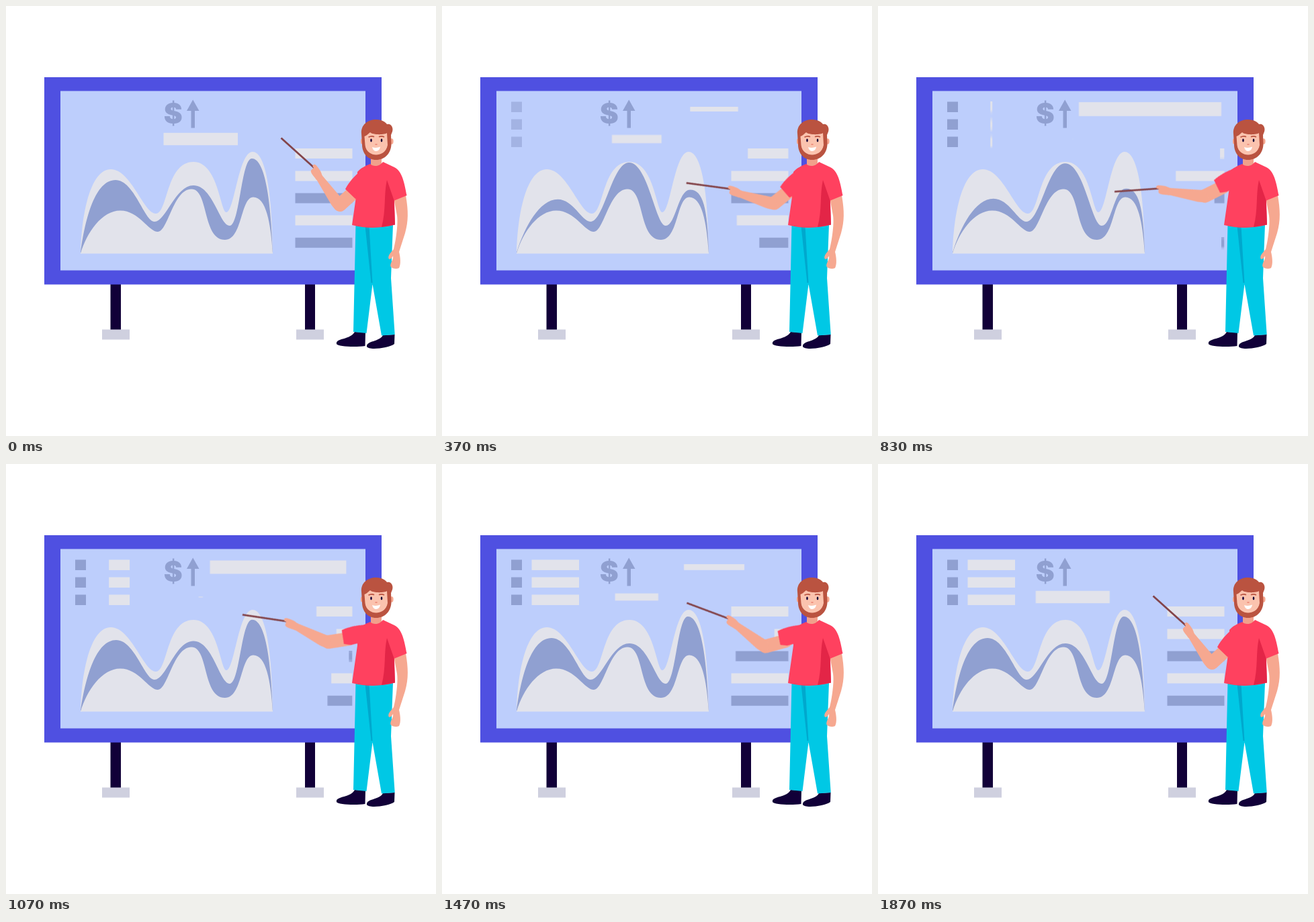
These frames come from a looping animation (640x640 px, 1930 ms). An HTML page:

```html
<!DOCTYPE html>
<html lang="en">
<head>
<meta charset="utf-8">
<title>Presentation</title>
<style>
  html, body { margin: 0; width: 100%; height: 100%; overflow: hidden; background: #fff; }
  svg { display: block; width: 100vw; height: 100vh; }

  .frame { fill: #4f50e1; }
  .screen { fill: #bdcefc; }
  .light { fill: #e2e3eb; }
  .dark { fill: #90a0d1; }
  .navy { fill: #110038; }
  .foot { fill: #cfd0df; }
  .skin { fill: #f6a890; }
  .hair { fill: #ba5340; }
  .shirt { fill: #ff415f; }
  .jeans { fill: #00c8e5; }
  .dollar { font: 900 42px Inter, "Liberation Sans", sans-serif; text-anchor: middle; }

  .move { animation: 1930ms cubic-bezier(.333, 0, .667, 1) infinite; }

  /* list bars, anchored at the right */
  .row { transform-origin: 515.5px 0; }
  .row1 { animation-name: row1; }
  .row2 { animation-name: row2; }
  .row3 { animation-name: row3; }
  .row4 { animation-name: row4; }
  .row5 { animation-name: row5; }
  @keyframes row1 { 0%, 10.36%, 65.8%, 100% { transform: none } 34.2%, 41.97% { transform: scaleX(.07) } }
  @keyframes row2 { 0%, 35.75%, 93.1%, 100% { transform: none } 64.77%, 69.3% { transform: scaleX(.05) } }
  @keyframes row3 { 0%, 20.57%, 80.6%, 100% { transform: none } 49.3%, 55.75% { transform: scaleX(.06) } }
  @keyframes row4 { 0%, 14.04%, 71.35%, 100% { transform: none } 40.93%, 44.4% { transform: scaleX(0) } }
  @keyframes row5 { 0%, 7%, 68.97%, 100% { transform: none } 30.83%, 45.1% { transform: scaleX(.053) } }

  /* headline bars swap */
  .head1 { transform-origin: 289.8px 198px; animation-name: shrink; }
  .head2 { transform-origin: 405px 153.5px; animation-name: grow; }
  @keyframes shrink { 0%, 2.33%, 98.7%, 100% { transform: none } 46.1%, 48.2% { transform: scale(0) } }
  @keyframes grow { 0%, 2.33%, 98.7%, 100% { transform: scale(0) } 46.1%, 48.2% { transform: none } }

  /* legend */
  .keys { animation-name: fade; animation-timing-function: linear; }
  .labels { transform-origin: 168.7px 0; animation-name: widen; }
  @keyframes fade { 0% { opacity: 0 } 34%, 100% { opacity: 1 } }
  @keyframes widen { 0%, 38.55% { transform: scaleX(0) } 75.4%, 100% { transform: none } }

  .wave { animation-name: wave; }
  @keyframes wave {
    0%, 1.04%, 60.1%, 100% {
      d: path("M111 367 C118 315 133 259 163 259 C191 259 206 321 221 321 C238 321 252 267 279 267 C308 267 318 327 333 327 C348 327 350 227 366 227 C384 227 394 280 397 367 Z");
    }
    31.1% {
      d: path("M111 367 C126 335 152 303 177 303 C198 303 209 321 221 321 C243 321 254 215 278 215 C306 215 318 327 333 327 C348 327 352 298 371 298 C391 298 396 312 397 367 Z");
    }
  }

  /* pointing arm */
  .joint { animation-timing-function: cubic-bezier(.4, 0, .7, .6); }
  .sleeve { transform-origin: 540px 252px; animation-name: sleeve; }
  .upper { transform-origin: 540px 252px; animation-name: upper; }
  .fore { transform-origin: 496px 298px; animation-name: fore; }
  .hand { transform-origin: 466px 255px; animation-name: hand; }
  @keyframes sleeve {
    0%, 96.9%, 100% { transform: rotate(0deg) }
    19.17% { transform: rotate(5deg); animation-timing-function: linear }
    32.64% { transform: rotate(10deg) }
    43% { transform: rotate(20deg); animation-timing-function: cubic-bezier(.3, .4, .6, 1) }
    55.44% { transform: rotate(37deg) }
    76.17% { transform: rotate(35deg); animation-timing-function: cubic-bezier(.35, .15, .6, 1) }
  }
  @keyframes upper {
    0%, 96.9%, 100% { transform: rotate(0deg) }
    19.17% { transform: rotate(3.3deg); animation-timing-function: cubic-bezier(.3, .4, .6, 1) }
    32.64% { transform: rotate(4.3deg) }
    43% { transform: rotate(15.6deg); animation-timing-function: cubic-bezier(.3, .4, .6, 1) }
    55.44% { transform: rotate(33.5deg) }
    76.17% { transform: rotate(27.3deg); animation-timing-function: cubic-bezier(.35, .15, .6, 1) }
  }
  @keyframes fore {
    0%, 96.9%, 100% { transform: rotate(0deg) }
    19.17% { transform: rotate(-41.1deg); animation-timing-function: cubic-bezier(.3, .4, .6, 1) }
    32.64% { transform: rotate(-59.4deg) }
    43% { transform: rotate(-61.8deg); animation-timing-function: cubic-bezier(.3, .4, .6, 1) }
    55.44% { transform: rotate(-61.2deg) }
    76.17% { transform: rotate(-44.6deg); animation-timing-function: cubic-bezier(.35, .15, .6, 1) }
  }
  @keyframes hand {
    0%, 96.9%, 100% { transform: rotate(0deg) }
    19.17% { transform: rotate(3.6deg); animation-timing-function: linear }
    32.64% { transform: rotate(1.8deg); animation-timing-function: linear }
    43% { transform: rotate(0deg); animation-timing-function: cubic-bezier(.3, .4, .6, 1) }
    55.44% { transform: rotate(-5.8deg) }
    76.17% { transform: rotate(-4.2deg); animation-timing-function: cubic-bezier(.35, .15, .6, 1) }
  }
</style>
</head>
<body>
<svg viewBox="0 0 640 640">
  <!-- board -->
  <path class="navy" d="M155.5 410h15.5v72h-15.5z M445 410h15v72h-15z"/>
  <path class="foot" d="M143 481.5h41v15h-41z M432 481.5h41v15h-41z"/>
  <rect class="frame" x="57" y="106" width="502" height="308.5"/>
  <rect class="screen" x="81" y="126.5" width="454" height="267"/>

  <!-- legend and headline -->
  <path class="dark move keys" d="M103 142.5h16v15.5h-16z M103 168.5h16v15.5h-16z M103 194.500h16v15.5h-16z"/>
  <path class="light move labels" d="M133.5 142.500h70.500v15.5h-70.500z M133.5 168.500h70.500v15.5h-70.500z M133.5 194.500h70.500v15.5h-70.500z"/>
  <text class="dark dollar" x="248.700" y="175">$</text>
  <path class="dark" d="M278.200 139.500L287.500 156H281V181.500H275.500V156H269Z"/>
  <rect class="light move head1" x="234.500" y="188.800" width="110.500" height="18.400"/>
  <rect class="light move head2" x="297.500" y="143" width="215" height="21"/>

  <!-- list -->
  <rect class="light move row row1" x="430.500" y="212" width="85" height="15"/>
  <rect class="light move row row2" x="430.500" y="245.500" width="85" height="15"/>
  <rect class="dark move row row3" x="430.500" y="278.500" width="85" height="15"/>
  <rect class="light move row row4" x="430.500" y="311.500" width="85" height="15"/>
  <rect class="dark move row row5" x="430.500" y="344.800" width="85" height="15"/>

  <!-- chart -->
  <path class="light" d="M111 368 C113 300 128 243 156 243 C186 243 205 309 223 309 C241 309 238 232 279 232 C316 232 319 307 328 307 C340 307 346 217 367 217 C385 217 396 270 397 368 Z"/>
  <path class="dark move wave" d="M111 367 C118 315 133 259 163 259 C191 259 206 321 221 321 C238 321 252 267 279 267 C308 267 318 327 333 327 C348 327 350 227 366 227 C384 227 394 280 397 367 Z"/>
  <path class="light" d="M111 368.500 C120 337 143 304.500 170 304.500 C198 304.500 212 336 226 336 C241 336 249 272.500 276 272.500 C302 272.500 292 348 326 348 C352 348 349 284.500 368 284.500 C387 284.500 394 322 397 368.500 Z"/>

  <!-- legs -->
  <path class="navy" d="M519 485L535 486L534.500 506C520 508 494 507 492 503C490 494 513 497 519 485Z M561 490L578.500 489L578 503C570 509 540 513 537 507C536 498 556 500 561 490Z"/>
  <path class="jeans" d="M520.500 325L576 325L573 405L578.700 489L559 490.500L545.500 414L536.500 487L517 485Z"/>
  <path fill="#00a8cd" d="M534.500 328L540.500 328L545.500 412L543.500 412Z"/>

  <!-- resting arm -->
  <path class="skin" d="M577 285L595 282C599 305 599 320 594 338L585 366C587 374 588 384 585 390C581 392 575 391 572.500 388C571 382 577 379 576 372C574 376 571 378 569.500 376C568 371 573 367 577 362C580 350 584 325 582 312Z"/>

  <!-- pointing arm -->
  <g class="move joint upper">
    <path d="M520 275L497 296" stroke="#f6a890" stroke-width="20" stroke-linecap="round"/>
    <g class="move joint fore">
      <path class="skin" d="M504 291.500L470 251.500L462 258L484 295.500C490 304 494 306 499 306Z"/>
      <g class="move joint hand">
        <path d="M409.500 196.500L460 242" stroke="#83444a" stroke-width="2.800"/>
        <path class="skin" d="M458 236C461 235 464 240 467 244C469 247 470 250 471 254L462 259C460 255 455 251 454 247C453 244 456 243 458 241C456 239 456 237 458 236Z"/>
      </g>
    </g>
  </g>

  <!-- shirt -->
  <path class="move joint sleeve shirt" d="M505 272.500L520 287L529 282L546 262L544 242L527 246C519 253 511 261 505 272.500Z"/>
  <path d="M543 222H559V240H543Z" fill="#f1a08b"/>
  <path class="shirt" d="M542 235C546 239 555 240 561 232L578 240C590 246 593 264 596.500 282L578 289.500L579 325.500Q547 334 515 326L523 270L523 247C528 241 535 238 542 235Z"/>
  <path fill="#e32547" d="M567 259L577.500 289L579 325.500L559 329C566 304 562 281 567 259Z"/>

  <!-- head -->
  <ellipse class="skin" cx="574" cy="201.500" rx="2.600" ry="4.200"/>
  <ellipse class="skin" cx="529.500" cy="201.500" rx="1.600" ry="4"/>
  <path class="hair" d="M529 190C528 177 538 169 551 169C560 169 565 173 567 176C573 174 577 181 575 187L573 192L573.500 206C573 220 563 229 551 229C538 229 530 219 530 206Z"/>
  <path fill="#fbc3ae" d="M533.500 194C537 193 539 190 542 188C546 192 563 192 567 189L568 207C566 218 557 221.500 551 221.500C544 221.500 535.500 217 534.500 207Z"/>
  <path d="M539.500 195.300Q544 192.800 548 194.800M555 194.800Q559 192.800 563 195" fill="none" stroke="#ba5340" stroke-width="1.800"/>
  <g class="navy">
    <ellipse cx="543.500" cy="200" rx="1.300" ry="2.400"/>
    <ellipse cx="559" cy="200" rx="1.300" ry="2.400"/>
  </g>
  <path d="M549.500 205.500Q551 207 552.500 205.500" fill="none" stroke="#ec8877" stroke-width="1.500"/>
  <path fill="#fff" d="M545 210Q551 212 557 209.500Q556 216 551 216Q546.500 216 545 210Z"/>
</svg>
</body>
</html>
```
